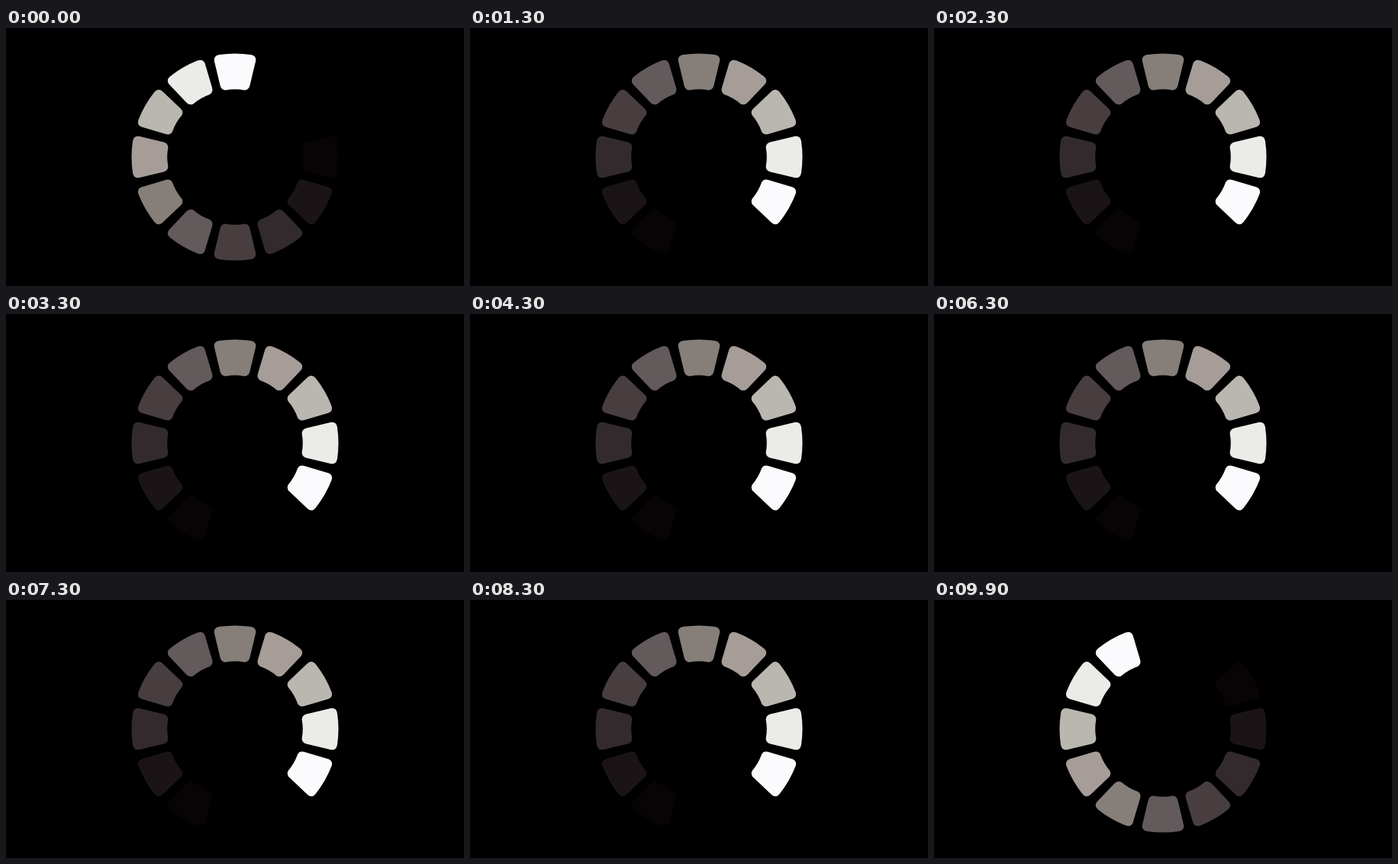
Write an HTML page with a canvas that moves like this. It is 600x338 px and loops after 10 s.

```html
<!DOCTYPE html>
<html lang="en">
<head>
<meta charset="utf-8">
<title>Loading ring</title>
<style>
  html, body { margin: 0; width: 100%; height: 100%; overflow: hidden; background: #000; }
  canvas { display: block; width: 600px; height: 338px; }
</style>
</head>
<body>
<canvas id="stage" width="600" height="338"></canvas>
<script>
  const ctx = document.getElementById("stage").getContext("2d");
  const COUNT = 12;
  const LOOP = 10000;
  const TICK = 100;

  // Colours from the head of the ring back to its tail; the rest stay black.
  const SHADES = [
    "#fbfafd", "#ebebe7", "#bab7b0", "#a69d99", "#867f79",
    "#635a5c", "#483e40", "#322a2d", "#1a1416", "#080405"
  ];

  // One rounded block, pointing up from the ring's centre.
  const block = new Path2D(`
    M-21-133.9 Q0-137.1 21-133.9
    Q28-132.6 27.2-126
    L19.4-93.5 Q18-87.8 12.5-87.6
    Q0-90 -12.5-87.6
    Q-18-87.8 -19.4-93.5
    L-27.2-126 Q-28-132.6 -21-133.9Z`);

  function draw(time) {
    const tick = Math.floor((time % LOOP) / TICK);
    // The head makes one turn of twelve places per second.
    const head = Math.floor((tick * 12 + 5) / 10) % COUNT;

    ctx.fillStyle = "#000";
    ctx.fillRect(0, 0, 600, 338);
    SHADES.forEach((shade, lag) => {
      ctx.save();
      ctx.translate(300, 169);
      ctx.rotate((head - lag) * 2 * Math.PI / COUNT);
      ctx.fillStyle = shade;
      ctx.fill(block);
      ctx.restore();
    });
  }

  const start = performance.now();
  function frame() {
    draw(performance.now() - start);
    requestAnimationFrame(frame);
  }
  frame();
</script>
</body>
</html>
```
